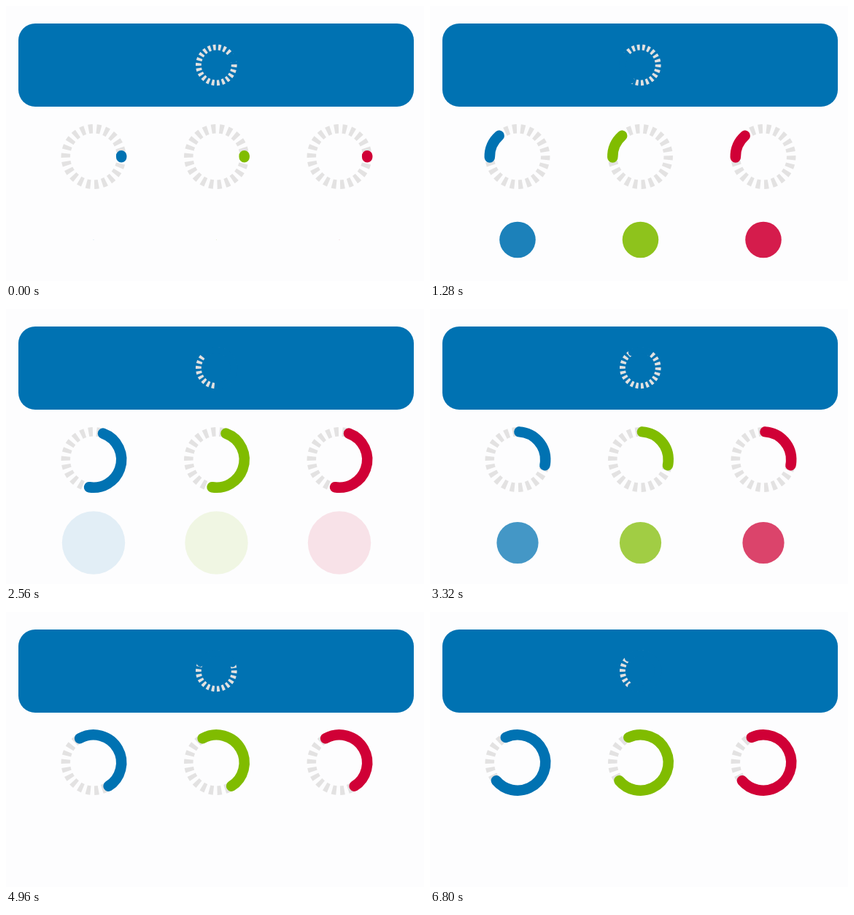
Recreate the animation shown at these times as an HTML page with a canvas. Size 573 by 377 pixels, loop 6.84 s.

```html
<!DOCTYPE html>
<html lang="en">
<head>
<meta charset="utf-8">
<title>Loading indicators</title>
<style>
html, body { margin: 0; width: 100%; height: 100%; overflow: hidden; background: #fdfdfe; }
canvas { display: block; width: 573px; height: 377px; }
</style>
</head>
<body>
<canvas id="stage"></canvas>
<script>
const W = 573, H = 377, LOOP = 6840;
const BLUE = '#0072b2', TICK = '#e3e2e2';
const items = [[120, BLUE], [288.5, '#80bc00'], [457, '#d00036']];
const TAU = Math.PI * 2, TICKS = 22, BASE = -2 * Math.PI / 180;
const PATH = 40 * Math.PI; // dash lengths refer to a circle of radius 20

const canvas = document.getElementById('stage');
const ctx = canvas.getContext('2d');
const ratio = window.devicePixelRatio || 1;
canvas.width = W * ratio;
canvas.height = H * ratio;
ctx.scale(ratio, ratio);

const mod = (a, n) => ((a % n) + n) % n;
const mix = (a, b, k) => a + (b - a) * k;

function bezier(x1, y1, x2, y2) {
  const at = (a, b, u) => 3 * (1 - u) * (1 - u) * u * a + 3 * (1 - u) * u * u * b + u * u * u;
  return x => {
    let lo = 0, hi = 1;
    for (let i = 0; i < 24; i++) {
      const mid = (lo + hi) / 2;
      if (at(x1, x2, mid) < x) lo = mid; else hi = mid;
    }
    return at(y1, y2, (lo + hi) / 2);
  };
}
const easeInOut = bezier(0.42, 0, 0.58, 1);
const ease = bezier(0.25, 0.1, 0.25, 1);

function ring(x, y, r, width, color) {
  const step = TAU / TICKS;
  ctx.strokeStyle = color;
  ctx.lineWidth = width;
  ctx.lineCap = 'butt';
  for (let i = 0; i < TICKS; i++) {
    const a = BASE + i * step;
    ctx.beginPath();
    ctx.arc(x, y, r, a, a + step * 0.525);
    ctx.stroke();
  }
}

// The dash grows, then its tail catches up with the end of the path.
function sweep(x, y, r, width, color, t) {
  const phase = mod(t, 1500) / 750;
  const k = easeInOut(phase % 1);
  const start = phase < 1 ? 35 * k : mix(35, 124, k);
  const length = phase < 1 ? mix(1, 89, k) : 89;
  const end = Math.min(start + length, PATH);
  const turn = BASE + mod(t, 2000) / 2000 * TAU;
  ctx.strokeStyle = color;
  ctx.lineWidth = width;
  ctx.lineCap = 'round';
  ctx.beginPath();
  ctx.arc(x, y, r, turn + start / PATH * TAU, turn + end / PATH * TAU);
  ctx.stroke();
}

function pulse(x, y, color, t) {
  const r = 50 * ease(mod(t + 10, 1000) / 1000);
  const alpha = Math.min(1, 1 - (r - 22.2) / 23.5);
  if (alpha <= 0) return;
  ctx.globalAlpha = alpha;
  ctx.fillStyle = color;
  ctx.beginPath();
  ctx.arc(x, y, r, 0, TAU);
  ctx.fill();
  ctx.globalAlpha = 1;
}

function draw(t) {
  ctx.fillStyle = '#fdfdfe';
  ctx.fillRect(0, 0, W, H);

  ctx.fillStyle = BLUE;
  ctx.beginPath();
  ctx.roundRect(17, 24, 542, 114, 23);
  ctx.fill();
  ring(288.3, 81, 24.4, 7.8, '#e2e1e0');
  sweep(288.3, 81, 24.4, 9.4, BLUE, t - 85);

  for (const [x, color] of items) {
    ring(x, 206.5, 38.2, 12.5, TICK);
    sweep(x, 206.5, 38.2, 14.5, color, t);
    pulse(x, 320.5, color, t);
  }
}

const begin = performance.now();
function tick() {
  draw((performance.now() - begin) % LOOP);
  requestAnimationFrame(tick);
}
tick();
</script>
</body>
</html>
```
